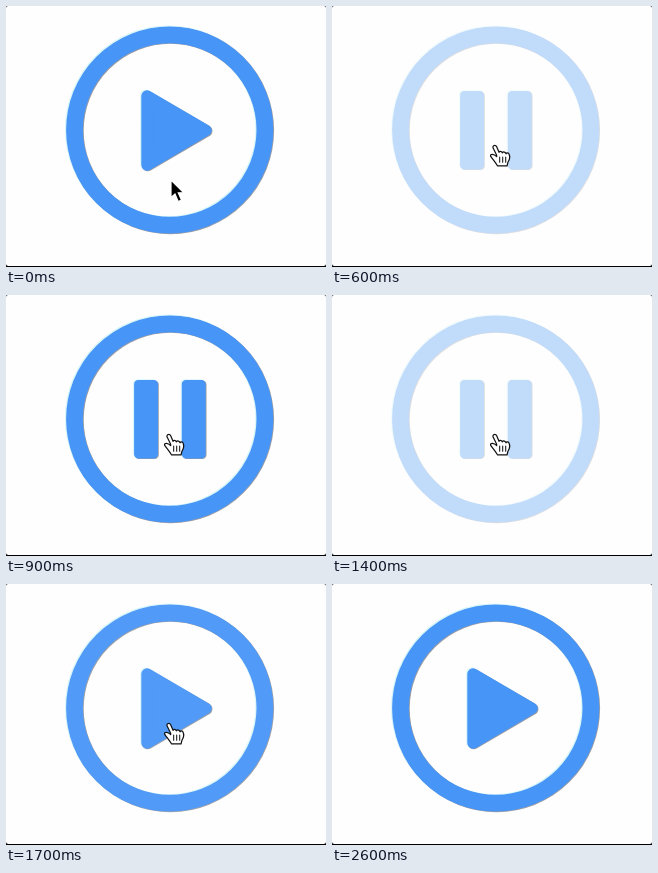
Recreate the animation shown at these times as an HTML page. Size 320 by 261 pixels, loop 5.9 s.

```html
<!DOCTYPE html>
<html lang="en">
<head>
<meta charset="utf-8">
<title>Play and pause button</title>
<style>
  html, body { margin: 0; width: 100%; height: 100%; overflow: hidden; background: #000; }
  svg { display: block; width: 100vw; height: 100vh; }
</style>
</head>
<body>
<svg viewBox="0 0 320 261">
  <defs>
    <circle id="ring" cx="163.7" cy="124" r="95.2" fill="none" stroke-width="16.8"/>
    <path id="play" d="M141 90V159L200 124.4Z" stroke-width="11.4" stroke-linejoin="round"/>
    <path id="pause" d="M132.3 89.2H147.8V159.3H132.3ZM180 89.2H195.5V159.3H180Z" stroke-width="8.4" stroke-linejoin="round"/>
  </defs>
  <rect width="320" height="200" fill="#666"/>
  <rect width="320" height="260" rx="2.5" fill="#fefefe"/>
  <g id="button">
    <g fill="#d8f6fa" stroke="#d8f6fa" transform="translate(-1.2 -.8)">
      <use href="#ring"/><use class="icon" href="#play"/>
    </g>
    <g fill="#9a9ca4" stroke="#9a9ca4" transform="translate(.8 .6)">
      <use href="#ring"/><use class="icon" href="#play"/>
    </g>
    <g fill="#4795f7" stroke="#4795f7">
      <use href="#ring"/><use class="icon" href="#play"/>
    </g>
  </g>
  <g id="cursor">
    <path id="arrow" d="M0 0V17.5L4 14L7.2 21.5L10.5 20L7.3 12.8H12.8Z"
          fill="#000" stroke="#fff" stroke-width="1.2"/>
    <g id="hand" transform="translate(.8 .3) scale(.94)" stroke="#111" stroke-width="1.3"
       stroke-linejoin="round" stroke-linecap="round">
      <path fill="#fff" d="M0 0C-2 0 -2.5 2 -1.5 3.5L2 10.5V12C-1 9 -5 9 -4.5 11.5
        C-3 14 -1 16 1 19L3 22H13L14 18C16 15 16 11 15 9C14 7.5 12.5 8 12 9
        C11.5 7 9 6.5 8 8C7 6 5 6 4.5 7.5L2 1.5C1.5 .3 1 0 0 0Z"/>
      <path fill="none" stroke-width="1.1" d="M5.2 12.5V18M8.4 12.5V18M11.6 12.5V18"/>
    </g>
  </g>
</svg>
<script>
  const LOOP = 5900, STEP = 100, FADE = 280, PALE = 0.33;
  const PRESSES = [500, 1400], HOLD = 100;
  const LEAVE = 2100, GONE = 2500, ICON_BOTTOM = 167;
  const $ = id => document.getElementById(id);
  const icons = document.querySelectorAll('.icon');
  const clamp = v => Math.max(0, Math.min(1, v));
  const show = (node, on) => node.setAttribute('visibility', on ? 'visible' : 'hidden');

  function buttonOpacity(t) {
    const press = PRESSES.filter(p => t >= p).pop();
    if (press === undefined) return 1;
    const left = 1 - clamp((t - press - HOLD) / FADE);
    return 1 - (1 - PALE) * left ** 2;
  }

  function cursorPosition(t) {
    const toRest = (1 - clamp(t / 300)) ** 2;
    const away = (Math.max(0, t - LEAVE) / 300) ** 2;
    return [162 + 3 * toRest + 5 * away, 139 + 35 * toRest + 100 * away];
  }

  function render(t) {
    const clicks = PRESSES.filter(p => t >= p + HOLD).length;
    icons.forEach(icon => icon.setAttribute('href', clicks % 2 ? '#pause' : '#play'));
    $('button').setAttribute('opacity', buttonOpacity(t));

    const [x, y] = cursorPosition(t);
    const visible = t < GONE, pointing = y < ICON_BOTTOM;
    $('cursor').setAttribute('transform', `translate(${x} ${y})`);
    show($('arrow'), visible && !pointing);
    show($('hand'), visible && pointing);
  }

  const start = performance.now();
  function tick() {
    const t = (performance.now() - start) % LOOP;
    render(Math.floor(t / STEP) * STEP);
    requestAnimationFrame(tick);
  }
  render(0);
  requestAnimationFrame(tick);
</script>
</body>
</html>
```
